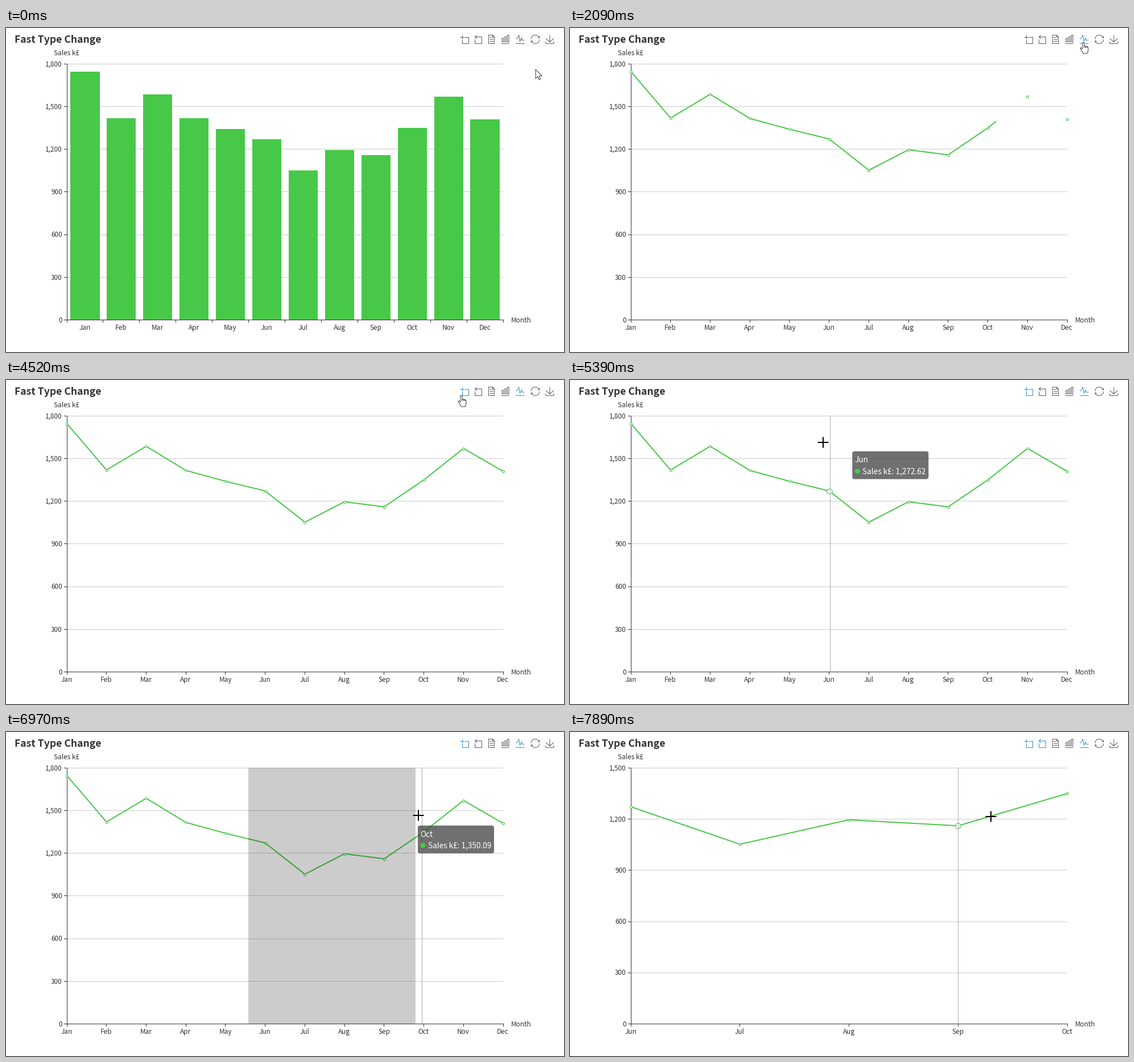
A matplotlib script for the animation above (8000 ms loop, 981x571 px).

```python
import numpy as np
import matplotlib.pyplot as plt
from matplotlib.animation import FuncAnimation
from matplotlib.patches import Circle, FancyBboxPatch, Polygon, Rectangle

W, H = 981, 571
LOOP, TICK = 8000, 40
PX = 0.72  # points per pixel at 100 dpi
L, R, T, B = 107, 874, 63.4, 514.4
GREEN, BLUE, INK, GREY = "#48c848", "#3e98c5", "#333333", "#666666"

MONTHS = "Jan Feb Mar Apr May Jun Jul Aug Sep Oct Nov Dec".split()
SALES = np.array([1747, 1420, 1587, 1417, 1341, 1272.62,
                  1053, 1196.40, 1161, 1350.09, 1572, 1411])
IDX = np.arange(12)
KEPT = (IDX >= 5) & (IDX <= 9)  # months left after zooming
BAND = (R - L) / 12
BAND_X = L + (IDX + 0.5) * BAND
POINT_X = L + IDX * (R - L) / 11
ZOOM_X = L + (IDX - 5) * (R - L) / 4

# Event times in ms
LINE_HOVER, SWITCH = 850, 1320
ZOOM_HOVER, ZOOM_CLICK = 3720, 4280
ENTER, ZOOM, TIP_OFF = 4690, 7400, 7860
BRUSH_X, TIP_W, TIP_H = 426, 134, 49

# Pointer moves: start, end, goal x, goal y
HOME = (931, 73)
GLIDES = [(200, 1010, 902.5, 25), (2600, 3230, 848, 35), (3300, 3900, 800.5, 27),
          (4540, 4690, 747, 66), (4690, 5570, 426.5, 113), (6080, 7200, 740, 149)]


def clamp(p):
    return min(max(p, 0), 1)


def ease(p):
    return 1 - (1 - clamp(p)) ** 3


def glide(p):
    """Quick start, soft landing, like a hand on a mouse."""
    p = clamp(p) ** 0.63
    return p * p * (3 - 2 * p)


def lerp(a, b, p):
    return a + (b - a) * p


def crisp(v):
    return np.floor(v) + 0.5


def cursor(t):
    pos = np.array(HOME, float)
    for start, end, *goal in GLIDES:
        pos = lerp(pos, np.array(goal), glide((t - start) / (end - start)))
    return pos


def nearest(t):
    xs = ZOOM_X if t >= ZOOM else POINT_X
    return int(np.argmin(abs(xs - cursor(t)[0])))


def trail():
    """Tooltip and axis pointer chase their targets; sampled every 10 ms."""
    out, tip, line = {}, cursor(ENTER) + 20, POINT_X[nearest(ENTER)]
    for t in range(ENTER, LOOP, 10):
        focus = nearest(max(t - 30, ENTER))
        mark = (ZOOM_X if t >= ZOOM else POINT_X)[focus]
        tip = lerp(tip, cursor(t) + 20, 1 - np.exp(-10 / 110))
        line = lerp(line, mark, 1 - np.exp(-10 / 40))
        out[t] = tip, line, focus
    return out


TRAIL = trail()

plt.rcParams["font.family"] = "Noto Sans CJK JP"
fig = plt.figure(figsize=(W / 100, H / 100), dpi=100, facecolor="white")
ax = fig.add_axes([0, 0, 1, 1])
ax.set(xlim=(0, W), ylim=(H, 0))
ax.axis("off")


def label(x, y, s, size=11.8, color=INK, **kw):
    return ax.text(x, y, s, fontsize=size * PX, color=color, va="baseline", **kw)


def stroke(xs=(), ys=(), color=INK, width=1.0, z=3, **kw):
    return ax.plot(xs, ys, color=color, lw=width * PX, zorder=z, snap=False,
                   solid_capstyle="butt", **kw)[0]


def shape(patch):
    return ax.add_patch(patch)


def broken(parts):
    """Join polylines into one array with gaps."""
    return np.vstack([np.vstack([p, (np.nan, np.nan)]) for p in parts]).T


def icon(cx, *parts):
    """Polylines scaled to a 15 px square around (cx, 20)."""
    pts = broken(parts)
    low, high = np.nanmin(pts, axis=1), np.nanmax(pts, axis=1)
    pts = (pts.T - (low + high) / 2) * 15 / max(high - low)
    return stroke(pts[:, 0] + cx, pts[:, 1] + 20, GREY, 1.1)


def box(x, y, w, h):
    return [(x, y), (x + w, y), (x + w, y + h), (x, y + h), (x, y)]


# Toolbox icons on a 15-unit grid
corner = [(8, 4), (15, 4), (15, 15), (4, 15), (4, 8)]
zoom_icon = icon(806, [(0, 4), (7, 4)], [(4, 0), (4, 7)], corner)
back_icon = icon(830.5, [(7, 1), (4, 4), (7, 7)], [(4, 4), (8, 4)], corner)
icon(853.5, [(0, 0), (7, 0), (10, 3.5), (10, 15), (0, 15), (0, 0)],
     [(7, 0), (7, 3.5), (10, 3.5)],
     *[[(2, y), (x, y)] for x, y in ((6, 4), (8.5, 7.5), (8.5, 11))])
icon(878, [(0, 15), (14, 15)],
     *[box(1 + 4.8 * i, 5.6 - 2.8 * i, 2.6, 6.4 + 2.8 * i) for i in range(3)])
line_icon = icon(904, [(0, 6.5), (2, 6.5), (5, 0), (7, 11), (10, 5), (11, 9), (15, 9)],
                 [(0, 15), (15, 15)])
turn = np.radians(np.linspace(-20, -180, 24))
half = [np.column_stack([8 * np.cos(turn), 8 * np.sin(turn)]),
        np.array([(4.9, -3), (7.7, -3), (7.7, -6)])]
icon(930.5, *half, *[-p for p in half])
icon(956, [(0, 6), (7, 12), (14, 6)], [(7, 0), (7, 12)],
     [(0, 11), (0, 15), (14, 15), (14, 11)])

label(15.3, 26, "Fast Type Change", 17.6, fontweight="bold")
label(106.2, 47.6, "Sales k£", ha="center")
label(888, 518.8, "Month")
hint = label(0, 44.2, "", color=BLUE, ha="center", zorder=4)

# Chart parts
grid = stroke(color="#cccccc", z=1)
ticks = stroke()
stroke([crisp(L)] * 2, [crisp(T), crisp(B)])
stroke([L, R + 1], [crisp(B)] * 2)
x_labels = [label(0, 532.2, m, ha="center") for m in MONTHS]
y_labels = [label(98.8, 0, f"{v:,}", ha="right") for v in range(0, 1801, 300)]
bars = [shape(Rectangle((x - 0.4 * BAND, B - v * (B - T) / 1800), 0.8 * BAND,
                        v * (B - T) / 1800, color=GREEN, lw=0, zorder=2))
        for x, v in zip(BAND_X, SALES)]
curve = stroke(color=GREEN, width=2, z=4, solid_joinstyle="bevel")
dots, focus_dot = [ax.plot([], [], "o", mfc="white", mec=GREEN, mew=1.1 * PX,
                           ms=size * PX, zorder=5, snap=False)[0]
                   for size in (4, 9.4)]
marker = stroke(color="#aaaaaa", z=6)
brush = shape(Rectangle((BRUSH_X, T - 0.4), 0, B - T, fc=(0, 0, 0, 0.2), lw=0,
                        zorder=7))

# Tooltip
tip_box = shape(FancyBboxPatch((0, 0), TIP_W, TIP_H, fc=(0.2, 0.2, 0.2, 0.7), lw=0,
                               boxstyle="round,pad=0,rounding_size=4", zorder=8))
tip_dot = shape(Circle((0, 0), 4.5, fc=GREEN, lw=0, zorder=9))
tip_name, tip_value = [label(0, 0, "", 13.6, "white", zorder=9) for _ in range(2)]
TIP = (tip_box, tip_dot, tip_name, tip_value)

# Mouse cursors, relative to the hot spot
ARROW = np.array([(0, 0), (0, 16), (3.6, 12.6), (6.2, 18.2), (8.6, 17.1),
                  (6.1, 11.6), (11.3, 11.3)])
HAND = np.array([(-1.5, 12), (-1.5, 0.5), (1.5, 0.5), (1.5, 6.5), (8.5, 9),
                 (8.5, 15), (7, 20), (0, 20), (-5.5, 11), (-4, 9.6)])
KNUCKLES = broken([[(x, 6.5), (x, 10)] for x in (1.5, 4, 6.5)])
CROSS = broken([[(-9.5, 0), (9.5, 0)], [(0, -9.5), (0, 9.5)]])
arrow, hand = [shape(Polygon(p, fc="white", ec="#222222", lw=0.9 * PX, zorder=10,
                             joinstyle="round")) for p in (ARROW, HAND)]
knuckles = stroke(color="#222222", width=0.9, z=11)
cross = stroke(color="black", width=2, z=10)


def draw_cursor(t):
    x, y = cursor(t)
    kind = "cross" if t >= ENTER else "hand" if y < 29.2 else "arrow"
    arrow.set_visible(kind == "arrow")
    hand.set_visible(kind == "hand")
    knuckles.set_visible(kind == "hand")
    cross.set_visible(kind == "cross")
    arrow.set_xy(ARROW + (x, y))
    hand.set_xy(HAND + (x, y))
    knuckles.set_data(KNUCKLES[0] + x, KNUCKLES[1] + y)
    cross.set_data(CROSS[0] + round(x), CROSS[1] + round(y))


def draw_toolbox(t):
    for part, since in ((line_icon, LINE_HOVER), (zoom_icon, ZOOM_HOVER),
                        (back_icon, ZOOM)):
        part.set_color(BLUE if t >= since else GREY)
    on_line = LINE_HOVER <= t < SWITCH
    hint.set_visible(on_line or ZOOM_HOVER <= t < ZOOM_CLICK)
    hint.set_text("Switch to Line Chart" if on_line else "Zoom Selection")
    hint.set_x(904 if on_line else 805.5)


def draw_axes(t, zoom, to_y):
    slide = ease((t - SWITCH + 60) / 300) if t >= SWITCH else 0
    shown = KEPT if t >= ZOOM else IDX >= 0
    xs = lerp(lerp(BAND_X, POINT_X, slide), ZOOM_X, zoom)
    edges = lerp(lerp(L + IDX * BAND, POINT_X, slide), ZOOM_X, zoom)[shown]
    if t < SWITCH:
        edges = np.append(edges, R)
    for text, x, on in zip(x_labels, xs, shown):
        text.set_x(x - 0.4)
        text.set_visible(on)
    ys = to_y(np.arange(0, 1801, 300))
    for text, y in zip(y_labels, ys):
        text.set_y(y + 4.3)
    y_labels[-1].set_visible(t < ZOOM)
    ys = crisp(ys[:-1] if t >= ZOOM else ys)
    grid.set_data(*broken([[(L, y), (R, y)] for y in ys[1:]]))
    ticks.set_data(*broken([[(L - 5, y), (L, y)] for y in ys]
                           + [[(x, B), (x, B + 5)] for x in crisp(edges)]))


def draw_series(t, xs, ys):
    lined = t >= SWITCH
    for bar in bars:
        bar.set_visible(not lined)
    curve.set_visible(lined)
    dots.set_visible(lined)
    grown = clamp((t - SWITCH + 62) / 1000)
    end = lerp(L, R, grown) + (grown == 1)
    curve.set_data(xs, ys)
    curve.set_clip_path(Rectangle((L - 1, T - 2), end - L + 1, B - T + 4,
                                  transform=ax.transData))
    inside = (xs > L - 1) & (xs < R + 1) & (KEPT | (t < ZOOM))
    dots.set_data(xs[inside], ys[inside])
    dots.set_markersize(4 * PX * ease(grown))


def draw_hover(t, xs, ys):
    hovering = t >= ENTER
    marker.set_visible(hovering)
    focus_dot.set_visible(hovering)
    for part in TIP:
        part.set_visible(hovering and t < TIP_OFF)
    dragged = cursor(t)[0] - 5.5 - BRUSH_X
    brush.set_visible(GLIDES[-1][0] <= t < ZOOM and dragged > 0)
    brush.set_width(max(dragged, 0))
    if not hovering:
        return
    (x, y), line_x, focus = TRAIL[t // 10 * 10]
    marker.set_data([crisp(line_x)] * 2, [T, B])
    focus_dot.set_data([xs[focus]], [ys[focus]])
    k = nearest(t)
    tip_box.set_bounds(x, y, TIP_W, TIP_H)
    tip_dot.set_center((x + 9, y + 35))
    tip_name.set_position((x + 4.5, y + 19.7))
    tip_name.set_text(MONTHS[k])
    tip_value.set_position((x + 18, y + 39.8))
    tip_value.set_text(f"Sales k£: {SALES[k]:,.2f}")


def draw(n):
    t = n * TICK + 15
    zoom = ease((t - ZOOM) / 350)
    scale = (B - T) * lerp(1 / 1800, 1 / 1500, zoom)

    def to_y(v):
        return B - v * scale

    xs, ys = lerp(POINT_X, ZOOM_X, zoom), to_y(SALES)
    draw_toolbox(t)
    draw_axes(t, zoom, to_y)
    draw_series(t, xs, ys)
    draw_hover(t, xs, ys)
    draw_cursor(t)
    return []


anim = FuncAnimation(fig, draw, frames=LOOP // TICK, interval=TICK,
                     repeat=True, repeat_delay=0, blit=False)
plt.show()
```
